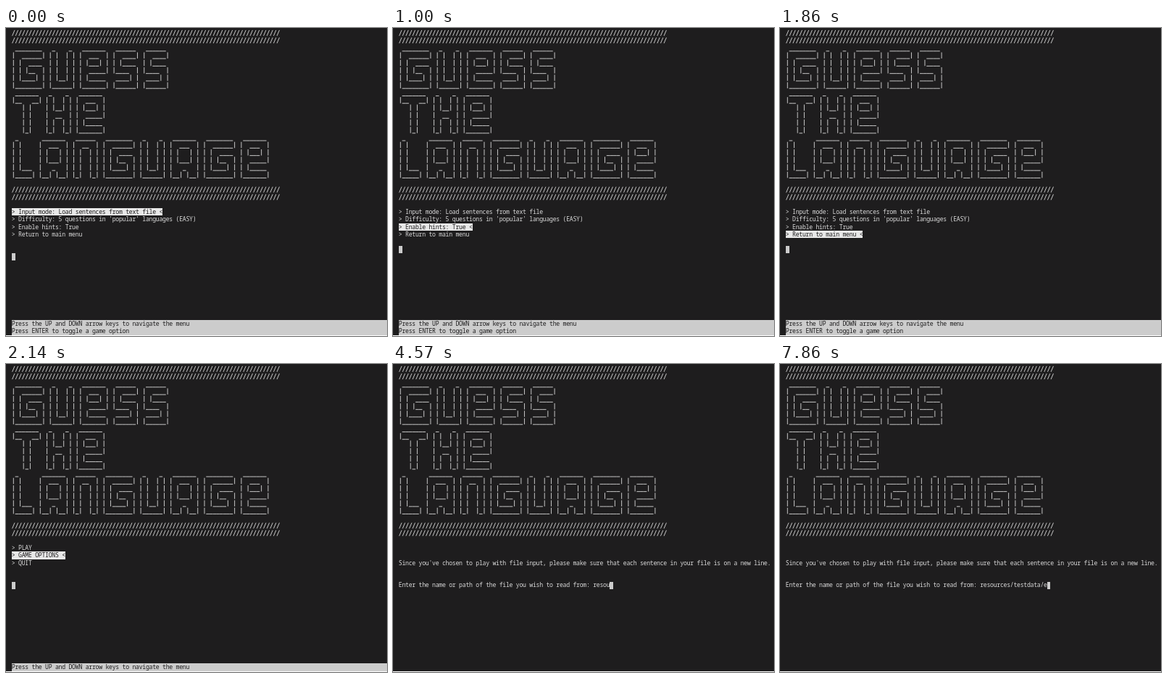
An HTML page with a canvas that plays this animation: 526x424 px, repeating every 8000 ms.

```html
<!DOCTYPE html>
<html lang="en">
<head>
<meta charset="utf-8">
<title>Guess the Language</title>
<style>
  html, body { margin: 0; width: 100%; height: 100%; overflow: hidden; background: #1e1d1e; }
  canvas { display: block; }
</style>
</head>
<body>
<canvas id="stage" width="526" height="424"></canvas>
<script>
const ctx = document.getElementById('stage').getContext('2d');
const LOOP = 8000;
const LEFT = 8, TOP = 1.7, CELL_W = 4.626, CELL_H = 10.27;
const BG = '#1e1d1e', FG = '#cccccc', LIT = '#e8e8e8', INK = '#dadada';

const GLYPHS = {
  G: [' ________ ', '|  ______|', '| |  ____ ', '| | |__  |', '| |____| |', '|________|'],
  U: [' _    _ ', '| |  | |', '| |  | |', '| |  | |', '| |__| |', '|______|'],
  E: [' _______ ', '|  ___  |', '| |___| |', '|  _____|', '| |_____ ', '|_______|'],
  S: [' ______ ', '|  ____|', '| |____ ', '|____  |', ' ____| |', '|______|'],
  T: [' _______ ', '|__   __|', '   | |   ', '   | |   ', '   | |   ', '   |_|   '],
  H: [' _    _ ', '| |  | |', '| |__| |', '|  __  |', '| |  | |', '|_|  |_|'],
  L: [' _     ', '| |    ', '| |    ', '| |    ', '| |___ ', '|_____|'],
  A: [' _______ ', '|  ___  |', '| |   | |', '| |___| |', '|   _   |', '|__| |__|'],
  N: [' ______ ', '|  __  |', '| |  | |', '| |  | |', '| |  | |', '|_|  |_|']
};

const banner = word => Array.from({ length: 6 }, (_, i) =>
  [...word].map(letter => GLYPHS[letter][i]).join(' '));

const SLASHES = '/'.repeat(80);
const TITLE = [
  SLASHES, SLASHES,
  ...banner('GUESS'), ...banner('THE'), ...banner('LANGUAGE'),
  '', SLASHES, SLASHES
];

const OPTIONS = [
  'Input mode: Load sentences from text file',
  "Difficulty: 5 questions in 'popular' languages (EASY)",
  'Enable hints: True',
  'Return to main menu'
];
const MAIN = ['PLAY', 'GAME OPTIONS', 'QUIT'];
const NAVIGATE = 'Press the UP and DOWN arrow keys to navigate the menu';
const TOGGLE = 'Press ENTER to toggle a game option';
const NOTICE = "Since you've chosen to play with file input, please make sure that each sentence in your file is on a new line.";
const PROMPT = 'Enter the name or path of the file you wish to read from: ';
const PATH = 'resources/testdata/e';

const optionsMenu = (selected, cursorRow = 29) => () =>
  drawMenu(OPTIONS, selected, cursorRow, [NAVIGATE, TOGGLE]);
const mainMenu = selected => () => drawMenu(MAIN, selected, 29, [NAVIGATE]);

const SCREENS = [
  [0, optionsMenu(0, 30)],
  [710, optionsMenu(1)],
  [1000, optionsMenu(2)],
  [1430, optionsMenu(3)],
  [2000, mainMenu(1)],
  [2570, mainMenu(0)],
  [3000, drawPrompt]
];

// [time, number of characters typed]
const TYPING = [
  [0, 0],
  [4140, 1], [4290, 2], [4430, 3], [4570, 5], [4710, 6], [4860, 7], [5000, 8], [5140, 10],
  [6140, 11], [6290, 12], [6430, 13], [6570, 14], [6710, 15], [6860, 17],
  [7140, 18], [7430, 19], [7860, 20]
];

const latest = (steps, t) => steps.filter(([start]) => start <= t).pop()[1];
const colX = col => LEFT + col * CELL_W;
const rowY = row => TOP + row * CELL_H;

// Fills cells on whole pixels so that neighbouring rows join without a seam.
function block(col, row, cells, color) {
  const x = Math.round(colX(col)), y = Math.round(rowY(row));
  ctx.fillStyle = color;
  ctx.fillRect(x, y, Math.round(colX(col + cells)) - x, Math.round(rowY(row + 1)) - y);
}

function write(text, row, color = INK) {
  ctx.fillStyle = color;
  [...text].forEach((ch, col) => {
    if (ch !== ' ') ctx.fillText(ch, colX(col + 0.5), rowY(row) + 7.9);
  });
}

function drawTitle() {
  ctx.strokeStyle = INK;
  ctx.lineWidth = 0.9;
  ctx.beginPath();
  TITLE.forEach((line, row) => [...line].forEach((ch, col) => {
    const x = colX(col), y = rowY(row), mid = x + CELL_W / 2;
    if (ch === '_') {
      ctx.moveTo(x, y + 9.6);
      ctx.lineTo(x + CELL_W, y + 9.6);
    } else if (ch === '|') {
      ctx.moveTo(mid, y + 1);
      ctx.lineTo(mid, y + 9.5);
    } else if (ch === '/') {
      ctx.moveTo(mid - 1.7, y + 9.1);
      ctx.lineTo(mid + 1.7, y + 1.2);
    }
  }));
  ctx.stroke();
}

function drawMenu(items, selected, cursorRow, footer) {
  items.forEach((item, i) => {
    const row = 24 + i;
    if (i === selected) {
      const label = `> ${item} <`;
      block(0, row, label.length, LIT);
      write(label, row, BG);
    } else {
      write(`> ${item}`, row);
    }
  });
  block(0, cursorRow, 1, FG);
  footer.forEach((line, i) => {
    const row = 41 - footer.length + i;
    block(0, row, 112, FG);
    write(line, row, BG);
  });
}

function drawPrompt(t) {
  const line = PROMPT + PATH.slice(0, latest(TYPING, t));
  write(NOTICE, 26);
  write(line, 29);
  block(line.length, 29, 1, FG);
}

function render(now) {
  const t = now % LOOP;
  ctx.fillStyle = BG;
  ctx.fillRect(0, 0, 526, 424);
  ctx.font = '500 8.2px "Noto Sans Mono", monospace';
  ctx.textAlign = 'center';
  drawTitle();
  latest(SCREENS, t)(t);
  ctx.fillStyle = '#fff';
  ctx.fillRect(0, 423, 526, 1);
}

const start = performance.now();
function tick() {
  render(performance.now() - start);
  requestAnimationFrame(tick);
}
tick();
</script>
</body>
</html>
```
